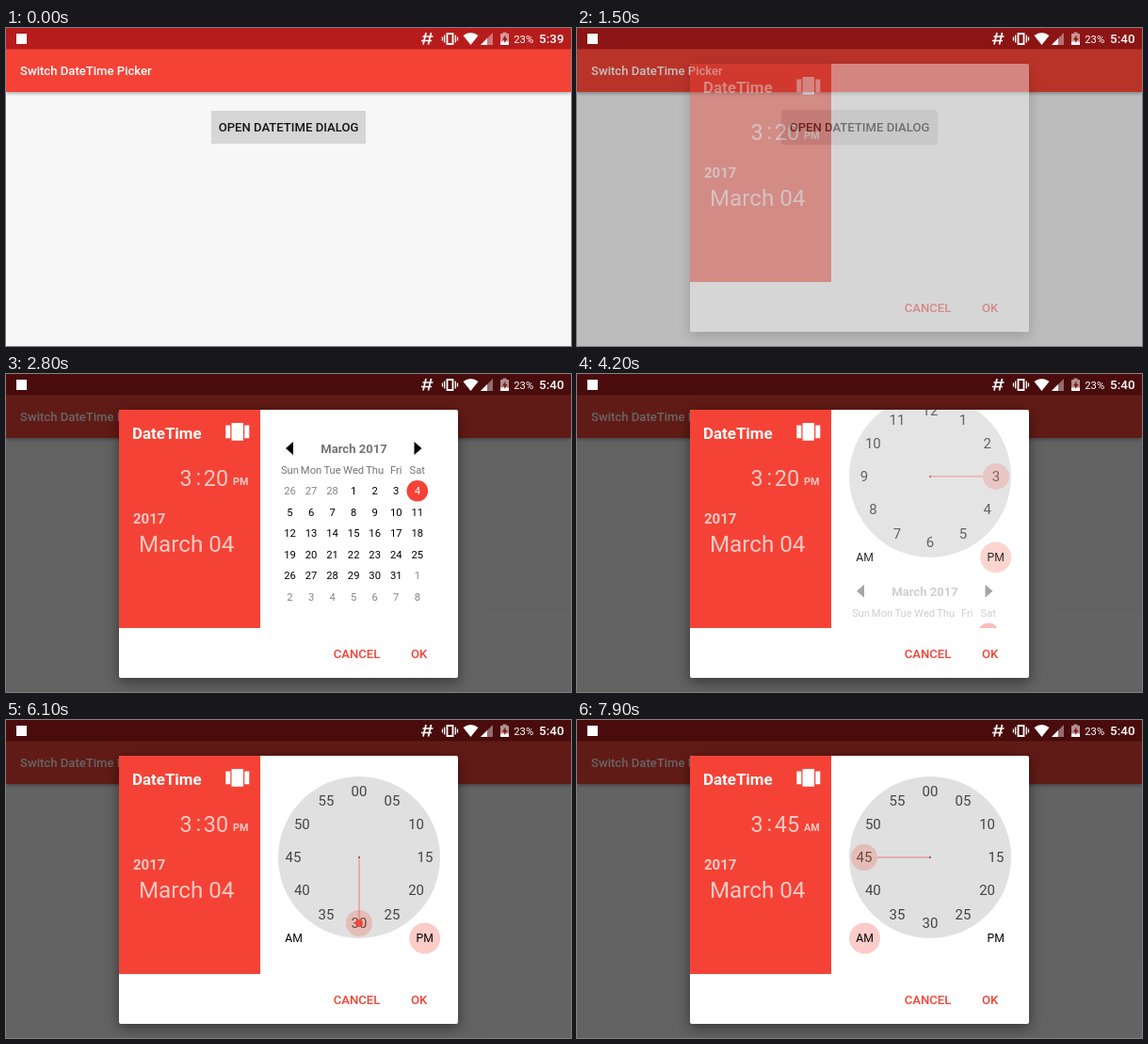
Animation of 600x338 px, one loop 8 s. Source, as an HTML page:

```html
<!DOCTYPE html>
<html lang="en">
<head>
<meta charset="utf-8">
<title>Date and time dialog</title>
<style>
html, body { margin: 0; width: 100%; height: 100%; overflow: hidden; background: #f8f7f8; }
svg { display: block; width: 600px; height: 338px; font-family: Roboto, "Open Sans", sans-serif; }
.shadow { filter: drop-shadow(0 1px 2px rgba(0, 0, 0, .4)); }
.deep { filter: drop-shadow(0 4px 7px rgba(0, 0, 0, .45)); }
</style>
</head>
<body>
<svg id="stage" viewBox="0 0 600 338"></svg>
<script>
const RED = '#f44336', LOOP = 8000, STEP = 100;
const CX = 375, CY = 146, RING = 70, KNOB = 14, PANE = 232;
const stage = document.getElementById('stage');

const clamp = u => Math.max(0, Math.min(1, u));
const decelerate = u => 1 - (1 - u) ** 2;
const accelDecel = u => (1 - Math.cos(Math.PI * u)) / 2;
const range = n => [...Array(n).keys()];

// Linear interpolation through [position, value] pairs
function keyed(u, ...keys) {
  for (let i = 1; i < keys.length; i++) {
    const [a, va] = keys[i - 1], [b, vb] = keys[i];
    if (u <= b) return va + (vb - va) * (u - a) / (b - a);
  }
  return keys[keys.length - 1][1];
}

const text = (x, y, s, size, fill = '#fff', weight = 400, anchor = 'start') =>
  `<text x="${x}" y="${y}" font-size="${size}" fill="${fill}" font-weight="${weight}" text-anchor="${anchor}">${s}</text>`;
const mid = (x, y, s, size, fill, weight) => text(x, y, s, size, fill, weight, 'middle');
const rect = (x, y, w, h, fill, extra = '') =>
  `<rect x="${x}" y="${y}" width="${w}" height="${h}" fill="${fill}" ${extra}/>`;
const circle = (x, y, r, fill, opacity = 1) =>
  `<circle cx="${x}" cy="${y}" r="${r}" fill="${fill}" fill-opacity="${opacity}"/>`;
const path = (d, fill, extra = '') => `<path d="${d}" fill="${fill}" ${extra}/>`;
const group = (body, dy, opacity) =>
  `<g transform="translate(0 ${dy})" opacity="${opacity}">${body}</g>`;

function statusIcons(t) {
  return rect(11, 6, 11, 11, '#fff') +
    path('M446 5l-3 12.5M451.500 5l-3 12.5M442.500 9h11M441 13.500h11', 'none', 'stroke="#fff" stroke-width="1.700"') +
    path('M468.500 6h6v11h-6z', 'none', 'stroke="#fff" stroke-width="1.800"') +
    path('M465.700 7.500v8M477.300 7.500v8M463.500 9.500v4M479.500 9.500v4', 'none', 'stroke="#fff" stroke-width="1.300"') +
    path('M485.500 8Q493.500 2 501.500 8L493.500 18z', '#fff') +
    path('M517 5v13h-13z', '#fff', 'fill-opacity=".4"') +
    path('M511 11v7h-7z', '#fff') +
    path('M527.500 4.500h4v1.500h2.500v12h-9v-12h2.500z', '#fff', 'fill-opacity=".55"') +
    rect(525, 14.5, 9, 3.5, '#fff') +
    path('M530.500 7.500l-3.500 5h2.200v3.500l3.300-5h-2z', '#8a1414') +
    text(539.3, 15.7, '23%', 11.25, '#fff') +
    text(592.5, 16.3, t < 300 ? '5:39' : '5:40', 13.4, '#fff', 500, 'end');
}

function mainScreen(t) {
  const lift = 1 + clamp((t - 900) / 500) * .5;
  return rect(0, 0, 600, 338, '#f8f7f8') +
    `<g class="shadow">${rect(0, 20, 600, 48, RED)}</g>` + rect(0, 0, 600, 22.5, '#b71c1c') +
    text(15, 50, 'Switch DateTime Picker', 13.1, '#fff', 500) +
    rect(218, 88, 164, 35, '#d6d6d6', `rx="2" style="filter:drop-shadow(0 ${lift * .6}px ${lift * .7}px rgba(0,0,0,.35))"`) +
    mid(300, 110.3, 'OPEN DATETIME DIALOG', 13.1, '#161616', 500);
}

function calendar() {
  const x = i => 301.5 + 22.55 * i;
  const names = ['Sun', 'Mon', 'Tue', 'Wed', 'Thu', 'Fri', 'Sat'];
  const days = range(42).map(i => {
    const n = i - 2, row = Math.floor(i / 7);
    const inside = n >= 1 && n <= 31;
    const label = n < 1 ? n + 28 : n > 31 ? n - 31 : n;
    const color = n === 4 ? '#fff' : inside ? '#000' : '#858585';
    return mid(x(i % 7), 128.3 + 22.5 * row, label, 11.25, color);
  });
  return path('M305 72v14l-8-7zM433.500 72v14l8-7z', '#000') +
    mid(369.5, 83.7, 'March 2017', 13.1, '#757575', 700) +
    names.map((s, i) => mid(x(i), 106, s, 11.25, '#757575')).join('') +
    circle(x(6), 124.2, 11.3, RED) + days.join('');
}

function selector(degrees, spread, dot) {
  const a = degrees * Math.PI / 180, at = r => [CX + r * Math.sin(a), CY - r * Math.cos(a)];
  const [x, y] = at(RING * spread), [lx, ly] = at(RING * spread - (dot ? 0 : KNOB));
  return circle(x, y, KNOB, RED, .23) + (dot ? circle(x, y, 4, RED, .9) : '') +
    `<line x1="${CX}" y1="${CY}" x2="${lx}" y2="${ly}" stroke="${RED}" stroke-width=".9" stroke-opacity=".7"/>` +
    circle(CX, CY, 1, '#a33');
}

function dial(labels, degrees, spread, opacity, dot) {
  if (opacity <= 0) return '';
  const numbers = labels.map((s, i) => {
    const a = i * Math.PI / 6, r = RING * spread;
    return mid(CX + r * Math.sin(a), CY - r * Math.cos(a) + 5.3, s, 15, '#444');
  });
  return group(numbers.join('') + selector(degrees, spread, dot), 0, opacity);
}

const hours = range(12).map(i => i || 12);
const minutes = range(12).map(i => String(i * 5).padStart(2, '0'));
const minuteAt = t => t < 6100 ? 20 : Math.round(30 + 15 * clamp((t - 6100) / 600));
const isAm = t => t >= 7900;

function clock(t) {
  const swap = t - 5370;
  const out = accelDecel(clamp(swap / 500)), back = accelDecel(clamp(swap / 625));
  return circle(CX, CY, 86, '#e0e0e0') +
    dial(hours, 90, keyed(out, [0, 1], [.2, .95], [1, 1.3]), 1 - out, t >= 5300 && t < 5400) +
    dial(minutes, minuteAt(t) * 6, keyed(back, [0, .7], [.2, .7], [.84, 1.05], [1, 1]),
      keyed(back, [0, 0], [.2, 0], [1, 1]), t >= 6100 && t < 6900) +
    circle(isAm(t) ? 305.5 : 444.7, 232, 16.5, RED, .27) +
    mid(305.5, 236, 'AM', 12.2, '#000') + mid(444.7, 236, 'PM', 12.2, '#000');
}

function header(t) {
  const soft = '#fcc9c5';
  return rect(120, 38, 150, PANE, RED) +
    text(134, 68.5, 'DateTime', 16.9, '#fff', 700) +
    path('M7 19h10V4H7zM2 17h4V6H2zM18 6v11h4V6z', '#fff', 'transform="translate(230.800 47) scale(1.250)"') +
    mid(191, 118.5, 3, 23.4, soft) + mid(204.3, 117.5, ':', 23.4, soft) +
    mid(223, 118.5, minuteAt(t), 23.4, soft) +
    text(241, 118.3, isAm(t) ? 'AM' : 'PM', 10.8, soft, 700) +
    text(135, 159, 2017, 15, soft, 700) + mid(191.7, 188.5, 'March 04', 24.2, soft);
}

function dialog(t) {
  const enter = decelerate(clamp((t - 1480) / 420));
  const u = clamp((t - 3900) / 500), clockIn = decelerate(u), calOut = accelDecel(u);
  const pane = (u < 1 ? group(calendar(), PANE * (enter - 1 + calOut), enter * (1 - calOut)) : '') +
    (u > 0 ? group(clock(t), PANE * (clockIn - 1), clockIn) : '');
  return `<g class="deep">${rect(120, 38, 360, 285, '#fff', 'rx="2"')}</g>` +
    `<g clip-path="url(#card)">${header(t)}</g><g clip-path="url(#pane)">${pane}</g>` +
    text(347.7, 301.7, 'CANCEL', 13.1, RED, 500) + text(430, 301.7, 'OK', 13.1, RED, 500);
}

const clips = `<clipPath id="card">${rect(120, 38, 360, 285, '#000', 'rx="2"')}</clipPath>` +
  `<clipPath id="pane">${rect(270, 38, 210, PANE, '#000')}</clipPath>`;

function scene(t) {
  const shown = clamp((t - 1440) / 150);
  return clips + mainScreen(t) +
    (shown ? rect(0, 0, 600, 338, '#000', `fill-opacity="${.6 * shown}"`) : '') +
    statusIcons(t) + (shown ? group(dialog(t), 0, shown) : '');
}

let last = -1;
function tick() {
  const t = Math.floor(performance.now() % LOOP / STEP) * STEP;
  if (t !== last) stage.innerHTML = scene(last = t);
  requestAnimationFrame(tick);
}
tick();
</script>
</body>
</html>
```
